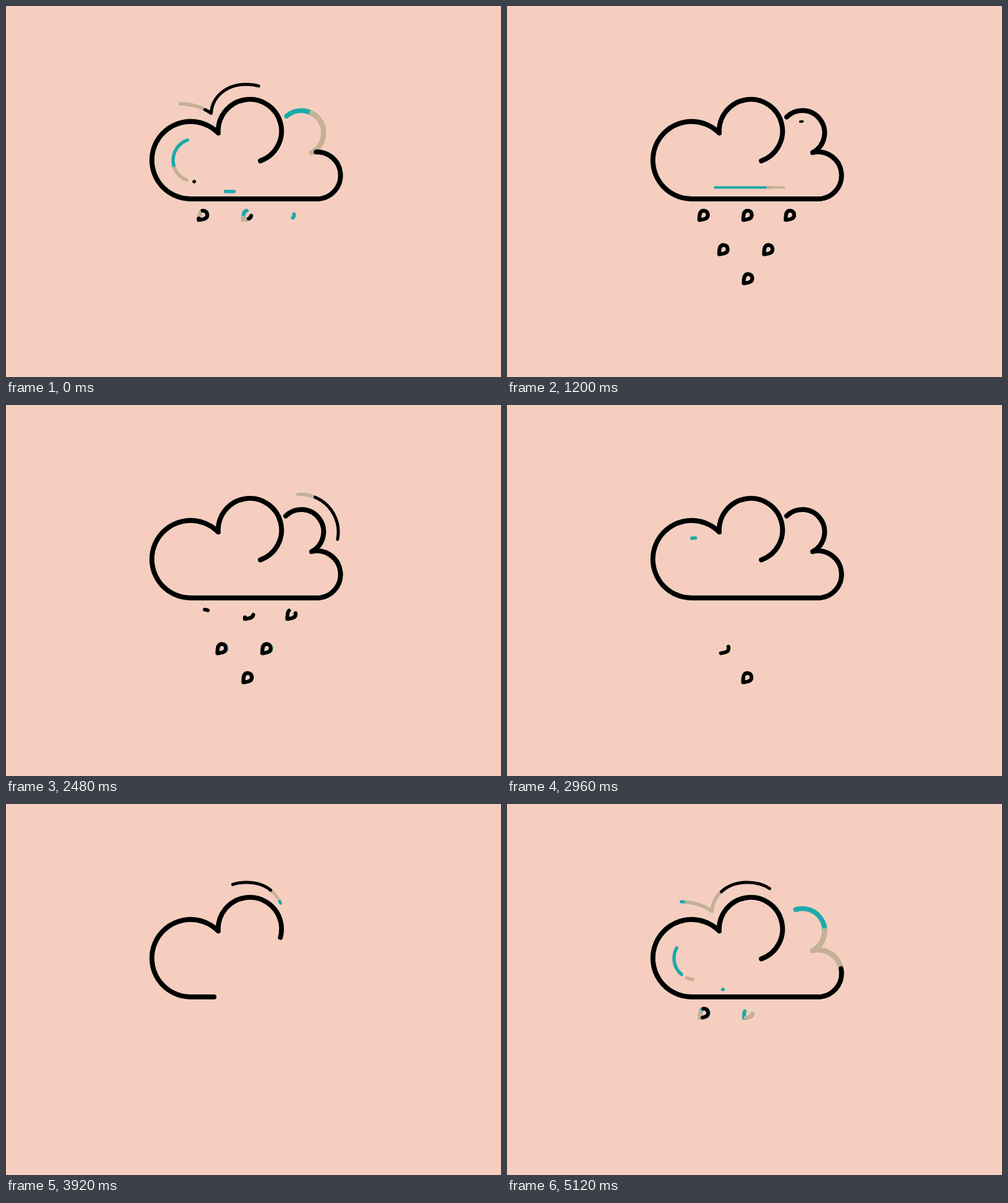
An HTML page for the animation above (5160 ms loop, 800x600 px).

```html
<!DOCTYPE html>
<html lang="en">
<head>
<meta charset="utf-8">
<title>Rain cloud</title>
<style>
  html, body { margin: 0; width: 100%; height: 100%; overflow: hidden; background: #f5cec0; }
  svg { display: block; width: 100%; height: 100%; }
  path { fill: none; stroke-linecap: round; stroke-linejoin: round; }
</style>
</head>
<body>
<svg id="stage" viewBox="0 0 800 600"></svg>
<script>
const LOOP = 5160;
const START = 760; // clock zero lies in the empty pause before the cloud is drawn
const LAYERS = [
  { color: '#1baaaa', lead: 160 },
  { color: '#c8b094', lead: 80 },
  { color: '#000', lead: 0 }
];
const stage = document.getElementById('stage');
const parts = [];

const ease = v => v * v * (3 - 2 * v);
const clamp = v => Math.min(1, Math.max(0, v));
const ramp = (t, from, dur) => clamp((t - from) / dur);
const glide = (t, from, dur) => ease(ramp(t, from, dur));

// Adds one stroke per colour; pose(t) returns [from, to, x, y] with the trim in 0..1.
function add(d, width, pose, closed) {
  for (const { color, lead } of LAYERS) {
    const el = document.createElementNS('http://www.w3.org/2000/svg', 'path');
    const attrs = { d, stroke: color, 'stroke-width': width, pathLength: 100 };
    for (const key in attrs) el.setAttribute(key, attrs[key]);
    stage.append(el);
    parts.push({ el, lead, pose, closed });
  }
}

function trim(el, from, to, closed) {
  const len = (to - from) * 100;
  el.style.display = len > 0.05 ? '' : 'none';
  if (len <= 0.05) return;
  const full = len > 99.9;
  const gap = closed ? 100 - len : 1000;
  el.setAttribute('stroke-dasharray', full ? 'none' : `${len} ${gap}`);
  el.setAttribute('stroke-dashoffset', -from * 100);
}

// Cloud outline grows both ways from its left side and shrinks back later.
const ORIGIN = 0.398;
add('M411 250.5A51.2 51.2 0 1 0 343 205.5A62.6 62.6 0 1 0 298 312H502A38 38 0 1 0 494 237A36 36 0 1 0 452 179.5',
  7.8, t => {
    const back = glide(t, 350, 345) - glide(t, 4587, 410);
    const ahead = glide(t, 368, 573) - glide(t, 4278, 600);
    return [ORIGIN * (1 - back), ORIGIN + (1 - ORIGIN) * ahead];
  });

// Highlights that run along a path: head and tail each have a start and a duration.
function sweep(d, width, head, headDur, tail, tailDur) {
  add(d, width, t => [glide(t, tail, tailDur), glide(t, head, headDur)]);
}
sweep('M445 163C432 135 412 126.8 388 126.8C357 126.8 333 146 331.5 173.5C318 164 300 158.5 281.5 158',
  5, 590, 240, 575, 570);
sweep('M304.5 284A34.5 34.5 0 0 1 304.5 215', 5.5, 752, 212, 752, 420);
sweep('M348 300H502A27 27 0 0 0 502 246H491', 5.5, 868, 300, 868, 540);
sweep('M482 221A17.5 17.5 0 0 0 474 187', 4, 1530, 250, 1530, 515);
sweep('M455 293.5H298A44.5 44.5 0 0 1 298 204.5', 4, 1965, 360, 1965, 800);
sweep('M563 280A61 61 0 0 0 534.6 222.4A61 61 0 0 0 472 144.6', 5, 3000, 320, 3000, 560);
sweep('M304.5 215A34.5 34.5 0 0 0 304.5 284', 5.5, 3805, 540, 4005, 400);
sweep('M281.5 158C300 158.5 318 164 331.5 173.5C333 146 357 126.8 388 126.8C412 126.8 432 135 445 163',
  5, 3960, 945, 4448, 440);

// Raindrops: each row sways between keys spaced 800 ms apart.
const DROP = 'M-6.6 7.6C0 6.6 7.2 6 7.2 -.6C7.2 -4.8 4.4 -7.6 .6 -7.6C-5 -7.6 -6.6 -3 -6.6 7.6Z';
const DROP_DUR = 270;
const rows = [
  { y: 338.5, keys: [317.5, 320.5, 317, 322.6, 319] },
  { y: 394, keys: [346, 346.3, 350, 347, 351] },
  { y: 441, keys: [392, 392.5, 388.7, 391.2, 388] }
];

function sway(keys, t) {
  const p = Math.min(keys.length - 1.001, Math.max(0, (t - 560) / 800));
  const i = Math.floor(p);
  return keys[i] + (keys[i + 1] - keys[i]) * ease(p - i);
}

function drop(row, dx, origin, show, hide) {
  const { y, keys } = rows[row];
  add(DROP, 6, t => {
    const len = ramp(t, show, DROP_DUR) - ramp(t, hide, DROP_DUR);
    return [origin - len, origin, sway(keys, t) + dx, y];
  }, true);
}
drop(0, 0, 0.62, 580, 3000);
drop(0, 71, 0.35, 724, 3080);
drop(0, 139.5, 0.4, 884, 3160);
drop(1, 0, 0.43, 1224, 3560);
drop(1, 72.5, 0.43, 1060, 3360);
drop(2, 0, 0.72, 1380, 3700);

function draw() {
  const now = (performance.now() + START) % LOOP;
  for (const { el, lead, pose, closed } of parts) {
    const [from, to, x, y] = pose(now + lead);
    trim(el, from, to, closed);
    if (closed) el.setAttribute('transform', `translate(${x} ${y})`);
  }
  requestAnimationFrame(draw);
}
draw();
</script>
</body>
</html>
```
